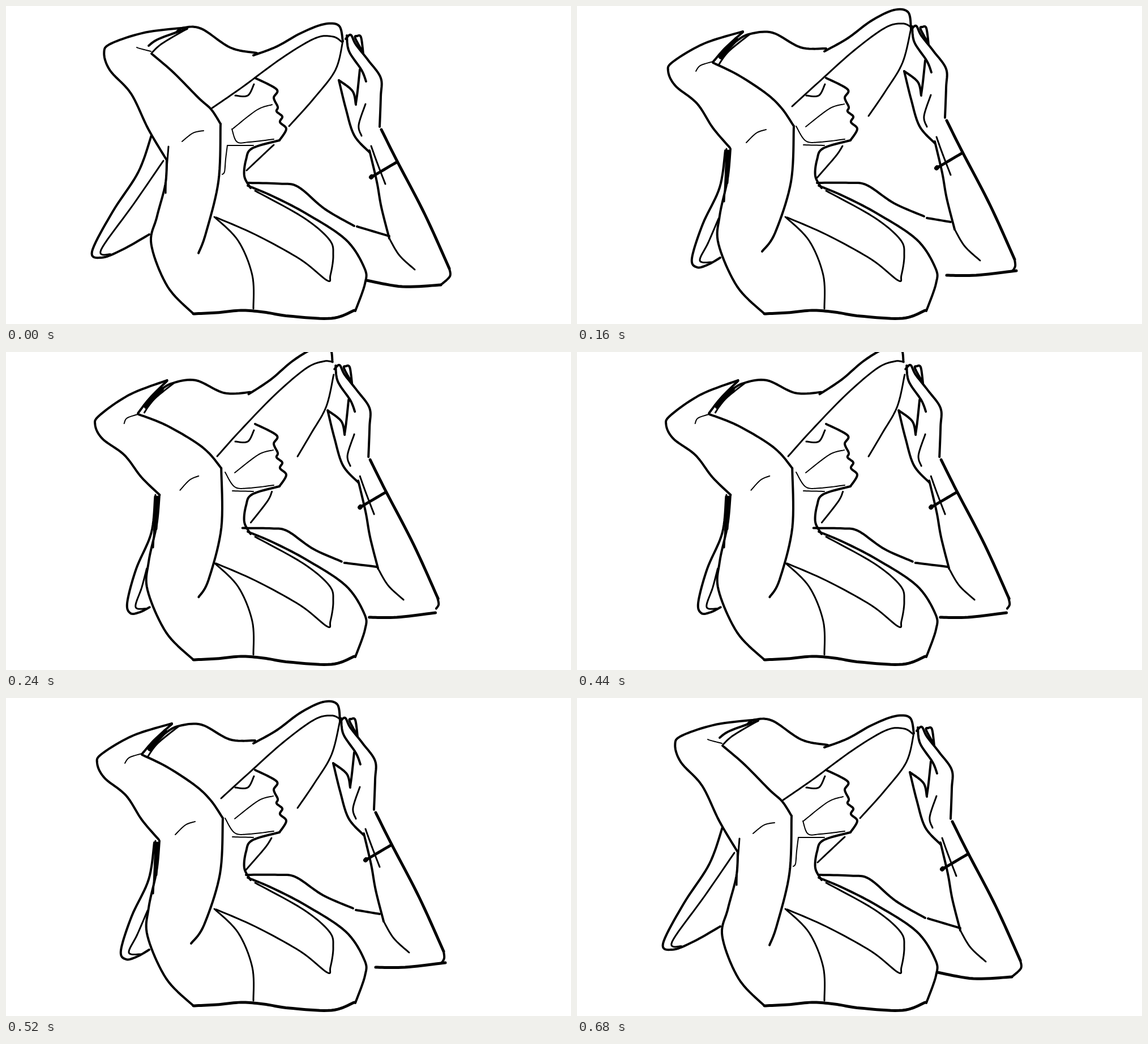
An HTML page with a canvas for the animation above (0.72 s loop, 998x561 px).

```html
<!DOCTYPE html>
<html lang="en">
<head>
<meta charset="utf-8">
<title>Woman with a hat</title>
<style>
html, body { margin: 0; height: 100%; overflow: hidden; background: #fff; }
canvas { display: block; }
</style>
</head>
<body>
<canvas id="stage" width="998" height="561"></canvas>
<script>
const ctx = document.getElementById('stage').getContext('2d');
ctx.lineCap = ctx.lineJoin = 'round';

const parse = s => s.split(' ').map(Number);
const mix = (a, b, t) => a + (b - a) * t;

// Offset k (x or y) at s along a line, spread evenly over the given knots
function offset(knots, s, k) {
  const last = knots.length / 2 - 1;
  const i = Math.min(Math.floor(s * last), Math.max(0, last - 1));
  return mix(knots[2 * i + k], knots[2 * Math.min(i + 1, last) + k], s * last - i);
}

// Catmull-Rom position between b and c
const spline = (a, b, c, d, t) =>
  b + t * (c - a + t * (2 * a - 5 * b + 4 * c - d + t * (3 * (b - c) + d - a))) / 2;

// Pose 0 is "rest", 1 the points as given, 2 is "far".
let pose;
function stroke(width, points, rest = '0 0', far = '0 0') {
  const p = parse(points), n = p.length / 2 - 1;
  const knots = parse(pose < 1 ? rest : far), amount = Math.abs(pose - 1);
  const at = (i, k) => {
    i = Math.max(0, Math.min(n, i));
    return p[2 * i + k] + amount * offset(knots, i / n, k);
  };
  ctx.lineWidth = width;
  ctx.beginPath();
  ctx.moveTo(at(0, 0), at(0, 1));
  for (let i = 0; i < n; i++) {
    for (let t = .1; t < 1.05; t += .1) {
      ctx.lineTo(...[0, 1].map(k => spline(at(i - 1, k), at(i, k), at(i + 1, k), at(i + 2, k), t)));
    }
  }
  ctx.stroke();
}

const thin = (...line) => stroke(2, ...line);
const fine = (...line) => stroke(3, ...line);
const bold = (...line) => stroke(4, ...line);
const heavy = (...line) => stroke(5, ...line);
const blot = (...line) => stroke(8, ...line);

function torso() {
  heavy('331 543 372 541 415 537 455 540 500 547 575 551 615 537');
  bold('427 317 470 335 530 366 600 412 633 462 634 490 617 538');
  fine('440 326 525 373 571 412 578 440 573 475 567 484 520 447 440 403 371 373');
  fine('368 372 410 414 435 475 437 534');
  bold('271 252 266 305 252 370 250 420 283 495 331 543', '13 20 17 3 4 0 0 0');
  fine('264 252 262 305 260 345', '23 -4 21 -5 22 -15');
  if (pose >= 1) heavy('267 256 265 312');
}

function head() {
  bold('440 127 478 147 473 162 480 178 478 186 488 195 484 205 495 217 483 237');
  bold('483 237 435 251 424 271 421 300 432 321');
  fine('405 158 427 158 438 138');
  thin('472 173 446 181 404 213', '-2 1 -4 4');
  thin('387 212 404 238 430 240 473 235', '12 5 0 0 0 0');
  thin('400 245 437 246', '-9 1 0 0');
  if (pose === 0) thin('391 246 388 270 386 292 382 297');
  fine('469 247 457 265 424 303', '4 -2 1 -13', '1 -1 12 -3');
}

function farArm() {
  bold('424 312 480 312 512 316 560 348 613 371', '3 0 4 3 2 17', '-9 -2 -21 0 -29 -2');
  bold('618 374 660 381', '2 15 17 25', '-29 -3 -8 -3');
  bold('773 447 774 459 769 468', '10 16 10 18 -1 24', '-15 -17 -13 -22');
  heavy('776 467 705 475 653 475', '-8 25 -5 20 -16 9', '-25 -10 -16 -10');

  const raised = (pen, points) => pen(points, '10 16', '-14 -17');
  raised(bold, '590 42 599 35 608 52 630 80 652 111 652 144 650 197');
  raised(bold, '592 36 596 64 618 97 626 117');
  raised(bold, '621 67 607 41 610 37 617 39 621 68');
  raised(bold, '578 115 590 164 605 212 632 242');
  raised(bold, '578 115 602 134 608 158');
  raised(bold, '608 156 611 134 615 96');
  raised(fine, '625 157 613 194 618 213');
  raised(bold, '632 239 645 294 653 339 667 394');
  raised(fine, '667 394 685 424 712 449');
  raised(fine, '635 231 645 259 660 298');
  raised(heavy, '635 286 681 259');
  raised(blot, '635 286 636 285');
  raised(heavy, '653 202 680 256 730 352 773 447');
}

function bentArm() {
  bold('293 45 225 66 170 98 161 115 174 141 212 172 240 215 270 250',
    '27 -7 14 -36 8 -24 14 22', '-12 7 -5 21 -5 16 2 3');
  bold('240 100 285 122 335 155 362 181 383 212', '17 -16 5 7 -4 -4', '-9 14 -4 -10');
  bold('383 212 378 310 350 400 327 433', '-4 -4 -2 0 13 3', '-4 -10 7 5 19 -1');
  bold('293 46 262 74 240 99', '27 -6 8 -16 12 -29', '-12 7 -10 13');
  fine('305 50 268 80 250 104', '15 -10 8 -14 8 -22', '-12 7 -8 4');
  if (pose >= 1) blot('281 59 267 74 254 90', '0 0', '-9 9');
  thin('210 115 218 105 240 98', '21 -42 16 -18', '-2 16 -10 17');
  thin('299 241 317 224 334 218', '12 -2 15 2', '12 4 9 1');
}

function hat() {
  bold('280 63 303 50 345 47 395 73 440 75', '20 -16 0 -7 3 8', '-18 13 -15 4 -12 -6');
  bold('437 80 478 57 520 26 560 7 585 11 590 40', '0 7 0 26 5 22', '-12 -8 -19 -18 -19 -32');
  fine('590 40 575 100 545 150 515 194', '5 22 8 8 -15 18', '-16 0 -12 -8 0 -14');
  fine('380 177 425 136 490 78 545 38 575 31 590 37', '-16 3 0 17 4 27', '-10 10 -21 -10 -19 -28');
}

function backBrim() {
  bold('262 255 252 320 222 385 203 445 212 461 232 456 253 444',
    '-5 -27 -25 -27 -51 -12 -37 -20 0 -41', '2 0 16 -5 1 9');
  fine('250 375 232 417 217 449 238 452', '28 -102 -7 -67 -49 -19 -53 -14', '-2 10 11 -2 17 1 14 1');
}

// The pose swings out and back, one held drawing per 80 ms; the far one stays longer.
function poseAt(ms) {
  const step = Math.floor(ms / 80);
  if (step === 4 || ms >= 320 && ms < 440) return 2;
  const back = ms >= 440 ? Math.floor((760 - ms) / 80) : step;
  return [0, .5, 1, 1.7][back];
}

function tick() {
  const ms = performance.now() % 720;
  const next = ms >= 680 ? 0 : poseAt(ms);
  if (next !== pose) {
    pose = next;
    ctx.clearRect(0, 0, 998, 561);
    for (const part of [torso, head, farArm, bentArm, hat, backBrim]) part();
  }
  requestAnimationFrame(tick);
}
tick();
</script>
</body>
</html>
```
